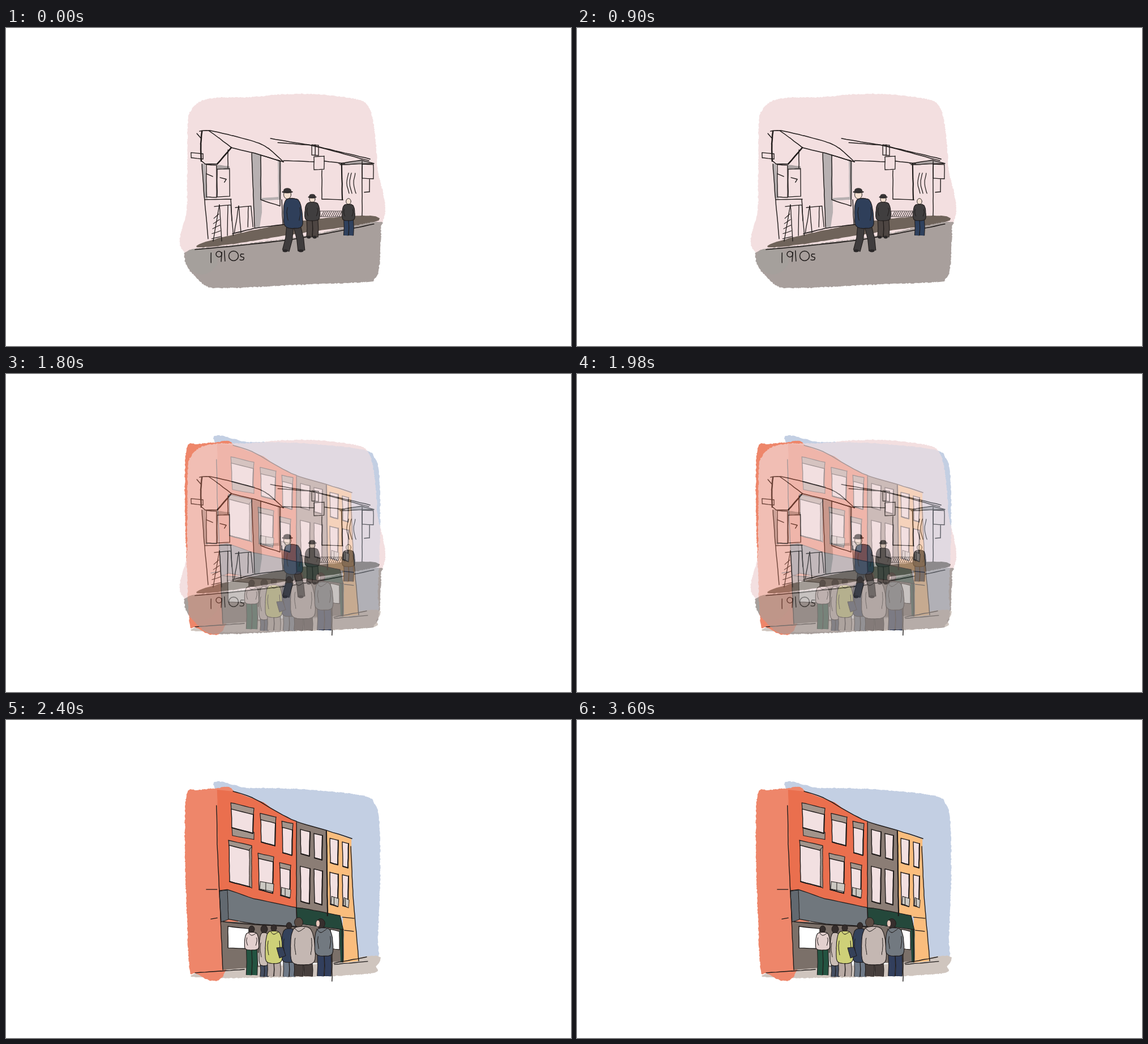
Write an HTML page with a canvas that moves like this. It is 998x561 px and loops after 4400 ms.

```html
<!DOCTYPE html>
<html lang="en">
<head>
<meta charset="utf-8">
<title>Street, then and now</title>
<style>
html, body { margin: 0; width: 100%; height: 100%; overflow: hidden; background: #fff; }
canvas { display: block; width: 998px; height: 561px; }
</style>
</head>
<body>
<canvas id="stage" width="998" height="561" role="img" aria-label="1910s street fading into the same street today"></canvas>
<script>
const INK = '#1f1b1a', TAUPE = '#a2948b', SHADE = '#b7b0b1';
const stage = document.getElementById('stage').getContext('2d');
let pen, seed = 7;

function random() {
  seed = (seed * 16807) % 2147483647;
  return seed / 2147483647;
}

function layer(paint) {
  const canvas = document.createElement('canvas');
  canvas.width = 998;
  canvas.height = 561;
  pen = canvas.getContext('2d');
  pen.lineCap = pen.lineJoin = 'round';
  paint();
  return canvas;
}

// Hand-drawn path through key points: straight or Catmull-Rom, shaken by `rough` pixels.
function trace(coords, { closed = false, smooth = false, rough = .5, step = 9 } = {}) {
  const n = coords.match(/[\d.]+/g).map(Number), count = n.length / 2;
  const at = (i, k) => n[(closed ? (i + count) % count : Math.max(0, Math.min(count - 1, i))) * 2 + k];
  const shake = () => (random() - .5) * rough;
  pen.beginPath();
  for (let i = 0; i < (closed ? count : count - 1); i++) {
    const length = Math.hypot(at(i + 1, 0) - at(i, 0), at(i + 1, 1) - at(i, 1));
    const steps = Math.max(smooth ? 4 : 1, Math.round(length / step));
    for (let s = 0; s <= steps; s++) {
      const t = s / steps;
      const [x, y] = [0, 1].map(k => {
        const [a, b, c, d] = [-1, 0, 1, 2].map(j => at(i + j, k));
        return smooth
          ? b + t / 2 * (c - a + t * (2 * a - 5 * b + 4 * c - d + t * (3 * (b - c) + d - a)))
          : b + (c - b) * t;
      });
      pen.lineTo(x + shake(), y + shake());
    }
  }
  if (closed) pen.closePath();
}

function paint(color, outline) {
  pen.fillStyle = color;
  pen.fill();
  if (outline) stroke(outline);
}

function stroke(width, color = INK) {
  pen.lineWidth = width;
  pen.strokeStyle = color;
  pen.stroke();
}

function poly(color, coords, outline) {
  trace(coords, { closed: true });
  paint(color, outline);
}

function blob(color, coords, outline, rough = .4) {
  trace(coords, { closed: true, smooth: true, rough, step: rough > 1 ? 2 : 6 });
  paint(color, outline);
}

function lines(width, ...list) {
  for (const coords of list) {
    trace(coords);
    stroke(width);
  }
}

function curve(width, coords) {
  trace(coords, { smooth: true });
  stroke(width);
}

function frame(x, y, w, h, tilt = 0, width = 1.3) {
  lines(width, `${x} ${y} ${x + w} ${y + tilt} ${x + w} ${y + h + tilt} ${x} ${y + h} ${x} ${y}`);
}

function oval(x, y, rx, ry, color, outline) {
  pen.beginPath();
  pen.ellipse(x, y, rx, ry, 0, 0, 7);
  if (color) paint(color, outline);
  else stroke(outline);
}

// One figure: legs, then head, then a rounded coat between shoulders and hip.
function person({ x, head, hip, feet, w, coat, legs, hair, r = 5, lean = 0, stride = .2, hat, hood }) {
  const top = head + r + 1, tall = hip - top, legWidth = w * .34;
  for (const side of [-1, 1]) {
    const from = x + side * w * .19, to = x + side * w * stride;
    for (const [width, color] of [[legWidth + 2, INK], [legWidth, legs]]) {
      pen.lineCap = 'butt';
      pen.beginPath();
      pen.moveTo(from, hip - 2);
      pen.lineTo((from + to) / 2 + stride * 4, (hip + feet) / 2);
      pen.lineTo(to, feet);
      stroke(width, color);
    }
    pen.lineCap = 'round';
    if (hat) oval(to - 1, feet, w * .14, 2.4, '#2a2728');
  }
  oval(x + lean, head, r, r + 1, hair, .9);
  const outline = [[-.24, 0], [.24, 0], [.43, .17], [.5, .55], [.45, .95], [0, 1.03], [-.45, .95], [-.5, .55], [-.43, .17]];
  blob(coat, outline.map(([u, v]) => `${x + lean * .25 * (1 - v) + u * w} ${top + v * tall}`).join(' '), 1.1);
  for (const side of [-1, 1]) {
    const arm = x + side * w * .33;
    curve(1, `${arm} ${top + tall * .3} ${arm + side} ${top + tall * .5} ${arm - side} ${top + tall * .75}`);
  }
  if (hood) curve(1, `${x + lean - r} ${top + 1} ${x + lean} ${top + r} ${x + lean + r + 3} ${top + 1}`);
  if (hat) {
    oval(x + lean, head - r * .75, r * 1.45, 2, hat, .6);
    oval(x + lean, head - r * 1.2, r, r * .55, hat, .6);
  }
}

function sandwichBoard(x, y, w, h, spread) {
  lines(1.3,
    `${x} ${y + 3} ${x + w} ${y} ${x + w + spread / 2} ${y + h - 10}`,
    `${x + spread} ${y} ${x - spread / 4} ${y + h}`,
    `${x + spread} ${y} ${x + spread + 4} ${y + h}`,
    `${x + w - 5} ${y + 1} ${x + w - 6} ${y + h - 10}`);
}

function oldStreet() {
  blob('#f3dfe0', '320 398 320 310 321 175 327 145 344 129 375 123 430 122 490 117 550 117 620 126 641 140 650 175 656 245 659 350 500 400', 0, 1.6);
  blob('#6f635a', '339 383 370 372 450 354 540 338 642 331 649 343 520 362 400 381 345 387', 0, 1);
  blob('#a89f9c', '316 408 324 392 400 383 520 368 652 342 662 354 661 395 658 428 651 442 636 448 520 453 380 459 352 454 336 440 322 424', 0, 1.8);
  blob('#a5a09c', '317 408 326 391 360 392 374 412 358 432 337 433 322 422', 0, 1);

  // Shaded posts
  poly(SHADE, '434 219 451 223 452 325 448 352 439 352');
  poly(SHADE, '480 235 486 236 486 303 451 304 451 300 481 298');
  poly(SHADE, '346 240 352 240 356 302 350 300');
  poly('#a9a1a1', '371 241 395 244 395 250 372 249');
  poly('#a9a1a1', '590 239 628 233 648 238 594 242');

  // Near shop
  curve(1.5, '342 182 360 181 400 190 440 201 463 212 490 236');
  lines(1.5, '358 181 376 194 398 211 439 221 490 236', '337 186 344 194', '345 234 352 240 373 240');
  lines(2.5, '346 182 344 205 345 235', '398 211 373 240');
  frame(327, 220, 21, 9, 2);
  lines(1.4, '346 240 350 295 357 372', '397 302 399 340', '434 221 439 351', '487 303 489 347', '392 215 392 247');
  frame(354, 241, 18, 57, 1);
  frame(373, 249, 22, 49, -1);
  frame(450, 224, 34, 79, 11, 1.4);
  lines(1.4, '351 303 398 302', '354 257 365 262', '378 264 389 267 386 272');
  sandwichBoard(368, 312, 29, 64, 9);
  for (let i = 0; i < 5; i++) lines(1.1, `${376 + i} ${328 + i * 10} ${367 - i} ${336 + i * 9}`);
  sandwichBoard(405, 314, 28, 47, 6);
  lines(1.6, '400 363 440 353 495 346', '334 391 400 385 500 374 579 360 650 346');

  // Far shops
  lines(1.5, '467 195 545 208 643 231', '480 202 540 207 597 222 641 234', '490 234 544 236', '562 235 598 239');
  frame(540, 206, 12, 18, 1);
  frame(544, 227, 18, 23, -1);
  lines(1.4, '546 206 546 225', '558 251 558 302 595 303', '629 235 629 331', '588 239 628 233 650 239 590 241', '642 267 642 289 633 290');
  frame(629, 240, 20, 25, 1);
  lines(2.2, '593 239 594 302');
  for (const x of [605, 610, 617]) curve(1.2, `${x} 256 ${x - 3} 274 ${x + 1} 292`);
  frame(555, 323, 38, 10, 0, .8);
  for (let x = 557; x < 592; x += 3.5) lines(1, `${x} 332 ${x + 4} 324`);

  // Hand-lettered year
  lines(1.5, '362 397 362 414', '381 396 380 412', '386 393 387 411');
  oval(376, 399, 5, 5, null, 1.5);
  oval(402, 402, 8.5, 8.5, null, 1.5);
  curve(1.5, '420 399 415 399 415 403 420 405 419 409 413 409');

  const dark = '#403e3f', skin = '#f3dfd0';
  person({ x: 508, head: 294, hip: 352, feet: 393, w: 33, coat: '#2f3f5a', legs: '#3f3c3d', hair: skin, r: 6.5, lean: -11, stride: .42, hat: '#383536' });
  person({ x: 541, head: 302, hip: 339, feet: 369, w: 26, coat: dark, legs: '#4d4542', hair: skin, hat: '#383536' });
  person({ x: 605, head: 306, hip: 339, feet: 366, w: 22, coat: dark, legs: '#2f415e', hair: skin, r: 4.3 });
}

// Rows of windows: sill heights follow the wall's slope from its first column.
function windowRow(columns, { y, slope, h, grow = 0, lintel = 0, shift = 0, boxed = [] }) {
  columns.forEach(([left, w], i) => {
    const along = left - columns[0][0], x = left + shift;
    const top = y + slope * along, drop = w * .25, height = h + grow * along;
    const quad = (from, to, pad) => `${x - pad} ${top + from} ${x + w + pad} ${top + drop + from} ${x + w + pad - 1} ${top + drop + to} ${x + 1 - pad} ${top + to}`;
    if (lintel) poly(TAUPE, quad(-lintel, 1, 1), 1.2);
    poly('#f2e0e1', quad(0, height, 0), 1.4);
    lines(2, `${x + w} ${top + drop} ${x + w - 1} ${top + drop + height} ${x + 1} ${top + height}`);
    if (!boxed.includes(i)) return;
    const base = top + height;
    poly('#cbc8c2', `${x + 3} ${base - 14} ${x + w + 1} ${base - 10} ${x + w} ${base + 4} ${x + 2} ${base - 1}`, 1);
    lines(1, `${x + w / 2} ${base - 12} ${x + w / 2} ${base + 1}`);
  });
}

function newStreet() {
  blob('#c3cfe3', '370 122 430 120 500 121 560 125 634 134 651 148 659 175 661 270 657 380 653 426 590 426 540 300', 0, 1.6);
  blob('#cfc5be', '334 448 430 434 540 431 653 416 654 435 645 447 530 453 355 455', 0, 1.5);

  // Facades
  blob('#ee866a', '319 132 340 124 370 121 402 125 430 210 389 441 334 447 324 436 319 330 316 228', 0, 1.6);
  poly('#ea6f4e', '373 123 402 126 454 145 475 160 513 180 514 333 376 303');
  poly('#8b7d75', '513 180 567 195 569 346 513 333');
  poly('#fabd7d', '566 195 610 210 613 310 623 425 595 428 595 347 569 346');

  const brick = [[398, 39], [450, 26], [488, 18]];
  const narrow = [[520, 17], [544, 15], [572, 15], [594, 11]];
  poly(TAUPE, '399 190 438 198 438 211 400 204', 1);
  windowRow(brick, { y: 157, slope: .36, h: 33, grow: .13, lintel: 11 });
  windowRow(brick, { y: 221, slope: .44, h: 64, grow: -.17, lintel: 9, shift: -4, boxed: [1, 2] });
  windowRow(narrow, { y: 193, slope: .3, h: 43 });
  windowRow(narrow, { y: 258, slope: .2, h: 62, grow: -.1, boxed: [2, 3] });
  poly(TAUPE, '430 228 434 224 434 297 430 293', 1);

  // Shop fronts
  poly('#7b7069', '380 355 513 360 597 370 597 426 500 431 383 441');
  poly('#fff', '392 364 429 368 429 404 392 402', 1.4);
  poly('#fff', '445 411 511 406 513 431 446 433');
  poly('#fff', '573 369 589 373 589 405 573 403', 1.2);
  poly('#23483b', '589 368 596 369 596 427 591 428');
  poly('#70777d', '377 301 391 299 437 315 513 331 513 364 440 360 390 351 380 356', 1.2);
  poly('#626970', '377 302 391 300 393 352 380 356', 1);
  poly('#24483b', '513 331 525 332 590 345 596 370 514 359', 1.2);

  // Outlines
  curve(1.5, '401 126 435 137 474 159 513 179 567 195 611 209');
  lines(1.4, '372 151 373 220 377 303 383 441', '513 181 513 333', '609 223 613 310 623 425', '594 370 595 427', '383 356 440 361 513 365');
  lines(2.2, '566 196 568 345');
  lines(1.3, '354 299 373 299', '362 351 373 349', '594 348 615 350', '598 371 614 373');
  lines(1.4, '334 446 380 443 421 440', '579 429 637 418', '580 431 639 426', '576 400 576 461');

  // Queue
  const dark = '#352e2d';
  person({ x: 434, head: 369, hip: 405, feet: 450, w: 25, coat: '#e3d0ce', legs: '#235341', hair: dark, hood: true });
  person({ x: 456, head: 369, hip: 432, feet: 453, w: 18, coat: '#cabcb5', legs: '#454e61', hair: dark, r: 6 });
  person({ x: 500, head: 363, hip: 426, feet: 453, w: 27, coat: '#34425b', legs: '#6f7a88', hair: dark });
  person({ x: 473, head: 367, hip: 428, feet: 452, w: 30, coat: '#ced078', legs: '#b8aaa4', hair: dark, hood: true });
  poly('#354159', '478 402 489 401 494 416 483 420', 1);
  person({ x: 525, head: 357, hip: 430, feet: 452, w: 43, coat: '#c4b7b2', legs: '#473f3d', hair: '#5a4b43', r: 7.5, lean: -8, hood: true });
  person({ x: 562, head: 359, hip: 415, feet: 452, w: 32, coat: '#727980', legs: '#323f5d', hair: dark, r: 7.5, lean: -6, hood: true });
  oval(551, 359, 3.5, 6, '#e8c9bd', .7);
}

const before = layer(oldStreet);
const after = layer(newStreet);

function put(image, alpha = 1, mode = 'source-over') {
  stage.globalAlpha = alpha;
  stage.globalCompositeOperation = mode;
  stage.drawImage(image, 0, 0);
}

// The scenes dissolve in three hard steps; faint layers stay inside the strong one.
function draw(time) {
  const t = time % 4400;
  put(t < 2100 ? before : after, 1, 'copy');
  if (t >= 1500 && t < 1800) put(after, .08, 'source-atop');
  if (t >= 1800 && t < 2100) {
    put(after);
    put(before, .63);
  }
  if (t >= 2100 && t < 2400) put(before, .28, 'source-atop');
}

const start = performance.now();
function tick() {
  draw(performance.now() - start);
  requestAnimationFrame(tick);
}
tick();
</script>
</body>
</html>
```
